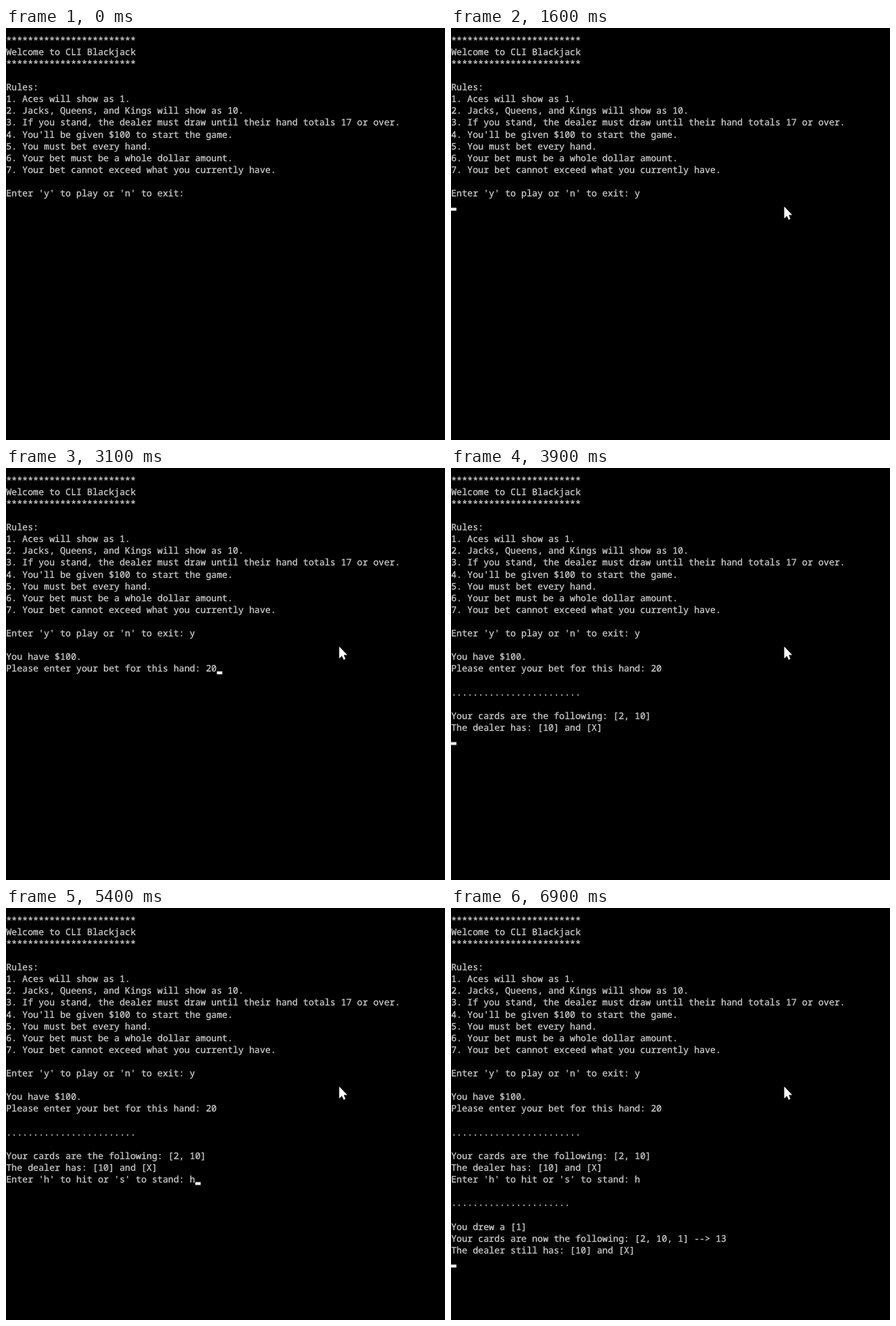
An HTML page with a canvas for the animation above (7.2 s loop, 600 px wide and 563 px high).

```html
<!DOCTYPE html>
<html lang="en">
<head>
<meta charset="utf-8">
<title>CLI Blackjack</title>
<style>
  html, body { margin: 0; width: 100%; height: 100%; overflow: hidden; background: #000; }
  canvas { display: block; }
</style>
</head>
<body>
<canvas id="stage" width="600" height="563"></canvas>
<script>
const ctx = document.getElementById('stage').getContext('2d');
const LOOP = 7200, CHAR = 7.39, ROW = 16.11, BASE = 4.6;
const stars = '*'.repeat(24);

const intro = `
${stars}
Welcome to CLI Blackjack
${stars}

Rules:
1. Aces will show as 1.
2. Jacks, Queens, and Kings will show as 10.
3. If you stand, the dealer must draw until their hand totals 17 or over.
4. You'll be given $100 to start the game.
5. You must bet every hand.
6. Your bet must be a whole dollar amount.
7. Your bet cannot exceed what you currently have.

Enter 'y' to play or 'n' to exit: `;

// [time in ms, text added to the terminal, caret visible]
const session = [
  [0, intro, false],
  [1200, 'y', true],
  [1600, '\n', true],
  [2100, '', false],
  [2500, '\nYou have $100.\nPlease enter your bet for this hand: ', false],
  [2800, '', true],
  [3100, '20', true],
  [3400, '\n\n' + '.'.repeat(24) + '\n', true],
  [3900, '\nYour cards are the following: [2, 10]\nThe dealer has: [10] and [X]\n', true],
  [4200, "Enter 'h' to hit or 's' to stand: ", true],
  [4400, '', false],
  [5000, '', true],
  [5400, 'h', true],
  [6100, '\n', true],
  [6800, '\n' + '.'.repeat(22) + '\n\nYou drew a [1]\n' +
    'Your cards are now the following: [2, 10, 1] --> 13\n' +
    'The dealer still has: [10] and [X]\n', true],
];

// Pointer path: [time, x, y]
const path = [[100, 558, 446], [500, 485.4, 284], [600, 467, 260], [700, 455.4, 244]];
const arrow = new Path2D('M0 0V16.2L3.7 12.7 6.2 18 8.5 17 6.3 11.6H11Z');

function pointerAt(t) {
  const next = path.findIndex(p => p[0] > t);
  if (next < 0) return path[path.length - 1].slice(1);
  const [t0, x0, y0] = path[next - 1], [t1, x1, y1] = path[next];
  const k = (t - t0) / (t1 - t0);
  return [x0 + (x1 - x0) * k, y0 + (y1 - y0) * k];
}

function drawTerminal(t) {
  const past = session.filter(step => step[0] <= t);
  const lines = past.map(step => step[1]).join('').split('\n');
  ctx.font = `${CHAR / 0.6}px "Noto Sans Mono", monospace`;
  ctx.textRendering = 'geometricPrecision';
  ctx.fillStyle = ctx.strokeStyle = '#ccc';
  ctx.lineWidth = 0.3;
  lines.forEach((line, row) => {
    const y = row * ROW + BASE;
    ctx.fillText(line, 0.2, y);
    ctx.strokeText(line, 0.2, y);
  });
  if (past[past.length - 1][2]) {
    const row = lines.length - 1;
    ctx.fillStyle = '#f2f2f2';
    ctx.fillRect(lines[row].length * CHAR, row * ROW + BASE - 0.6, CHAR, 4);
  }
}

function drawPointer(t) {
  if (t < path[0][0]) return;
  ctx.save();
  ctx.translate(...pointerAt(t));
  ctx.fillStyle = '#fff';
  ctx.fill(arrow);
  ctx.restore();
}

function render() {
  const t = Math.floor(performance.now() % LOOP / 100) * 100;
  ctx.fillStyle = '#000';
  ctx.fillRect(0, 0, 600, 563);
  drawTerminal(t);
  drawPointer(t);
  requestAnimationFrame(render);
}
render();
</script>
</body>
</html>
```
